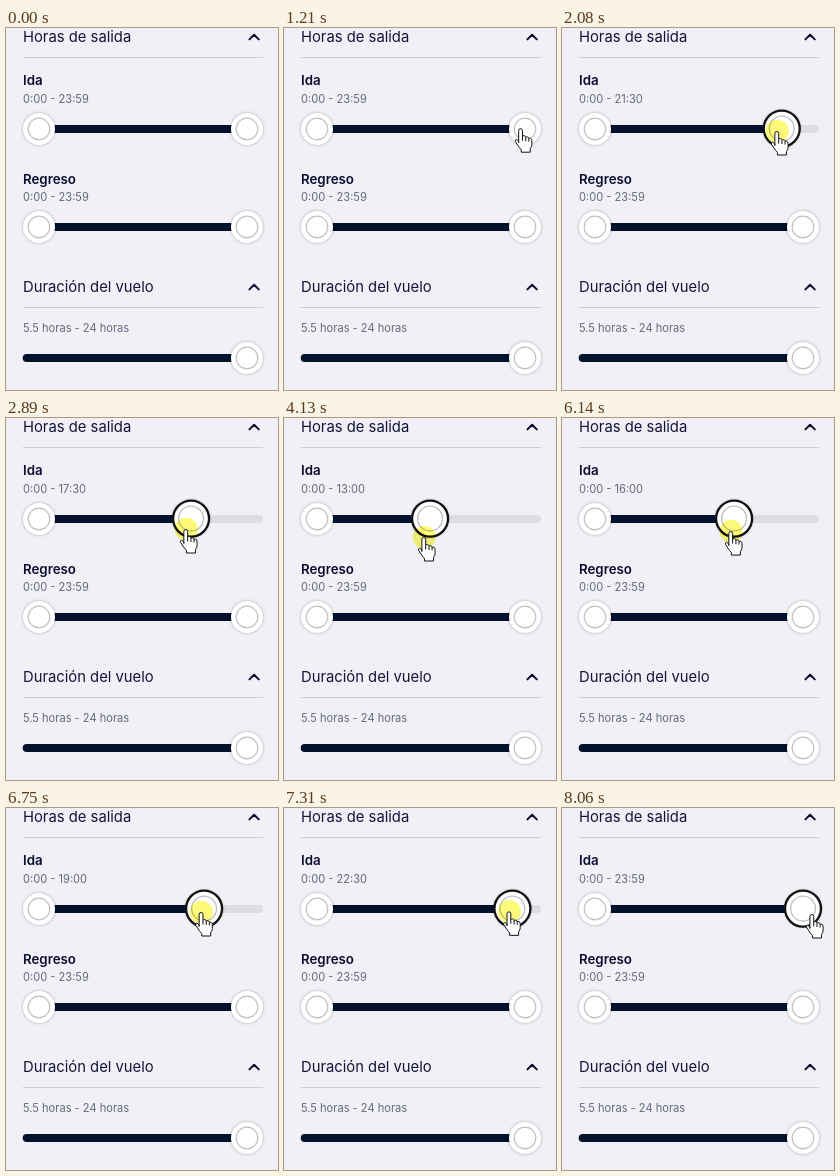
An HTML page for the animation above (8.26 s loop, 272 by 362 pixels).

```html
<!DOCTYPE html>
<html lang="es">
<head>
<meta charset="utf-8">
<title>Filtros de vuelo</title>
<style>
  html, body { margin: 0; width: 100%; height: 100%; overflow: hidden; background: #f1f0f7; }
  svg { display: block; width: 272px; height: 362px; font-family: Inter, "Open Sans", sans-serif; }
  .title { font-size: 14.8px; fill: #14143a; }
  .name { font-size: 13.3px; font-weight: 600; fill: #0c0c30; }
  .value { font-size: 11.1px; fill: #626a7c; }
  .rule { stroke: #cecdd6; }
  .chevron { fill: none; stroke: #0c0c30; stroke-width: 2; stroke-linecap: round; stroke-linejoin: round; }
  .track { stroke: #dcdce2; stroke-width: 8; stroke-linecap: round; }
  .fill { stroke: #03122c; stroke-width: 8; stroke-linecap: round; }
  .knob { fill: #fff; filter: drop-shadow(0 .6px 1.5px rgba(0, 0, 0, .3)); }
  .dimple { fill: #fff; stroke: #c0c0c6; stroke-width: 1.2; }
  .focus { fill: none; stroke: #121212; stroke-width: 2.3; }
  .glow { fill: #fcfa78; mix-blend-mode: multiply; }
  .pointer { fill: #fff; stroke: #111; stroke-linejoin: round; }
</style>
</head>
<body>
<svg id="stage" viewBox="0 0 272 362"></svg>
<script>
const LOOP = 8260, ENTER = 520, PRESS = 1610, RELEASE = 8060;
const MIN_X = 33, MAX_X = 241, GRIP = 5;

// Key points of the pointer: time (ms), x, y
const PATH = [
  [ENTER, 262, 314], [1010, 242, 93], [1280, 236.3, 104], [1820, 236.3, 104],
  [2080, 216, 104], [2890, 181, 112], [3800, 142, 120], [4130, 141, 120],
  [5000, 132.1, 119], [5400, 132.1, 119], [5610, 147, 122],
  [6750, 196.2, 105], [7590, 241, 104], [RELEASE, 251, 107]
];

const knob = (x, y) => `<circle class="knob" cx="${x}" cy="${y}" r="16"/>
  <circle class="dimple" cx="${x}" cy="${y}" r="10.8"/>`;
const line = (cls, x1, x2, y, id = '') =>
  `<line class="${cls}" id="${id}" x1="${x1}" x2="${x2}" y1="${y}" y2="${y}"/>`;
const text = (cls, y, label, id = '') => `<text class="${cls}" id="${id}" x="17" y="${y}">${label}</text>`;
const section = (y, label) => text('title', y, label) + line('rule', 17, 257, y + 15.5) +
  `<path class="chevron" d="M243.4 ${y - 2.6}l4.7-4.7 4.7 4.7"/>`;

const stage = document.getElementById('stage');
stage.innerHTML = `
  ${section(14, 'Horas de salida')}
  ${text('name', 57, 'Ida')}${text('value', 75, '', 'hours')}
  ${line('track', 21, 253, 101)}${line('fill', MIN_X, MAX_X, 101, 'fill')}
  ${knob(MIN_X, 101)}
  <g id="handle">${knob(0, 0)}</g>
  <circle class="focus" id="focus" r="18" cy="100.6"/>
  ${text('name', 156, 'Regreso')}${text('value', 173, '0:00 - 23:59')}
  ${line('fill', MIN_X, MAX_X, 199)}${knob(MIN_X, 199)}${knob(MAX_X, 199)}
  ${section(264, 'Duración del vuelo')}
  ${text('value', 304, '5.5 horas - 24 horas')}
  ${line('fill', 20.7, MAX_X, 330)}${knob(MAX_X, 330)}
  <circle class="glow" id="glow" r="11.5"/>
  <g class="pointer" id="pointer">
    <path id="arrow" d="M0 0V16.5L3.8 13 6.5 19 9 18 6.4 12H11.5Z"/>
    <g id="hand" transform="translate(-1.5 -.5)">
      <path d="M-1.6 14V2Q-1.6 0 .3 0T2.2 2V8Q2.4 6.8 4 7 5.5 7.2 5.5 9 6 8 7.4 8.3 8.6 8.6 8.6 10
        9.2 9.4 10.4 9.8 11.6 10.2 11.6 12V16Q11.6 18 10 20V23.5H1V21Q-1 19-2.5 16.5L-4.8 13
        Q-5.5 11-4 10.7-2.8 10.6-1.6 13Z"/>
      <path fill="none" d="M2.2 8V12M5.5 9V12.5M8.6 10V13"/>
    </g>
  </g>`;

const part = id => document.getElementById(id);
const [hours, fill, handle, focus, glow, pointer, arrow, hand] =
  ['hours', 'fill', 'handle', 'focus', 'glow', 'pointer', 'arrow', 'hand'].map(part);
const show = (el, on) => el.setAttribute('visibility', on ? 'visible' : 'hidden');

function pointerAt(t) {
  const next = PATH.findIndex(([time]) => time > t);
  if (next < 0) return PATH[PATH.length - 1].slice(1);
  const [t0, x0, y0] = PATH[Math.max(0, next - 1)];
  const [t1, x1, y1] = PATH[next];
  const k = (t - t0) / (t1 - t0 || 1);
  return [x0 + (x1 - x0) * k, y0 + (y1 - y0) * k];
}

// The slider snaps down to half hours
function hourAt(x) {
  const halves = Math.floor((x + GRIP - MIN_X) / (MAX_X - MIN_X) * 48);
  return Math.min(24, halves / 2);
}

function clock(hour) {
  if (hour === 24) return '23:59';
  return `${Math.floor(hour)}:${hour % 1 ? '30' : '00'}`;
}

function draw(t) {
  const [x, y] = pointerAt(t);
  const focused = t >= PRESS;
  const pressed = focused && t < RELEASE;
  const hour = pressed ? hourAt(x) : 24;
  const knobX = MIN_X + (MAX_X - MIN_X) * hour / 24 + (pressed ? .4 : 0);
  const hovering = Math.hypot(x - knobX, y - 101) < 20.7;

  hours.textContent = `0:00 - ${clock(hour)}`;
  fill.setAttribute('x2', knobX);
  handle.setAttribute('transform', `translate(${knobX} ${focused ? 100.6 : 101}) scale(${focused ? 1.15 : 1})`);
  focus.setAttribute('cx', knobX);
  show(focus, focused);
  glow.setAttribute('cx', x - .8);
  glow.setAttribute('cy', y - .8);
  show(glow, pressed);
  pointer.setAttribute('transform', `translate(${x} ${y})`);
  show(arrow, t >= ENTER && !hovering);
  show(hand, t >= ENTER && hovering);
}

const begin = performance.now();
function tick() {
  draw((performance.now() - begin) % LOOP);
  requestAnimationFrame(tick);
}
tick();
</script>
</body>
</html>
```
